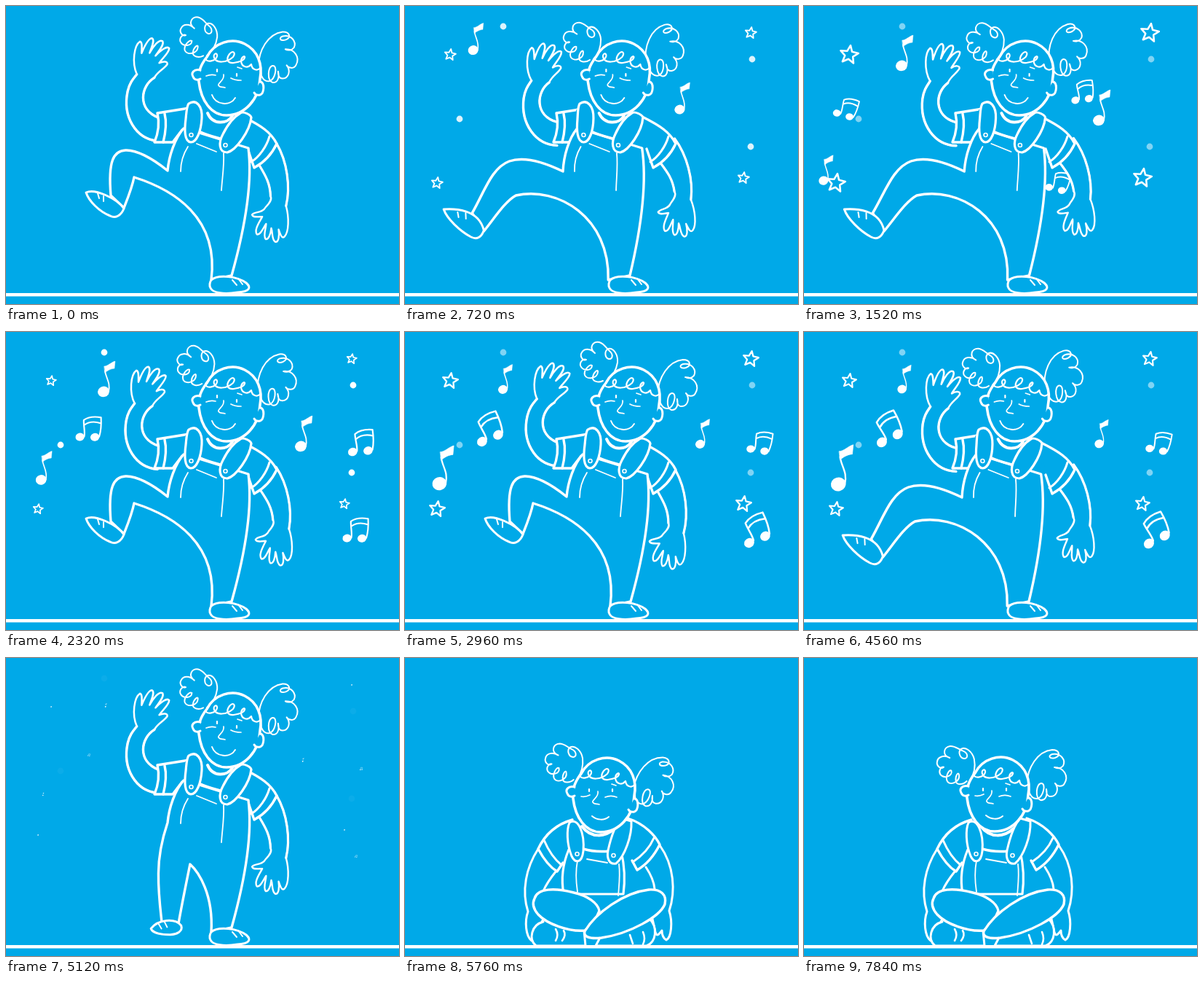
An HTML page with a canvas for the animation above (8000 ms loop, 540 by 409 pixels).

```html
<!DOCTYPE html>
<html lang="en">
<head>
<meta charset="utf-8">
<title>Dancing girl</title>
<style>
html, body { margin: 0; height: 100%; overflow: hidden; background: #00a9e8; }
canvas { display: block; }
</style>
</head>
<body>
<canvas id="stage" width="540" height="409"></canvas>
<script>
const ctx = document.getElementById('stage').getContext('2d');
const BLUE = '#00a9e8', WHITE = '#fff', LOOP = 8000, STEP = 80, BEAT = 960, PULSE = 1760;

const clamp = x => Math.max(0, Math.min(1, x));
const ramp = (x, a, b) => { const p = clamp((x - a) / (b - a)); return p * p * (3 - 2 * p); };
const lerp = (a, b, p) => a + (b - a) * p;
const wave = x => Math.cos(2 * Math.PI * x);

// Blend two paths that share the same commands
function mix(a, b, p) {
  const to = b.match(/-?[\d.]+/g);
  let i = 0;
  return a.replace(/-?[\d.]+/g, n => lerp(+n, +to[i++], p).toFixed(2));
}

// Linear interpolation through [position, value] pairs
function keyed(x, keys) {
  const i = Math.max(1, keys.findIndex(k => k[0] >= x));
  const [a, u] = keys[i - 1], [b, v] = keys[i];
  return lerp(u, v, (x - a) / (b - a));
}

function line(d, width = 3.4, fill) {
  const path = new Path2D(d);
  if (fill) { ctx.fillStyle = fill; ctx.fill(path); }
  ctx.lineWidth = width;
  if (width) ctx.stroke(path);
}
const solid = (d, width = 3.4) => line(d, width, BLUE);

function oval(x, y, rx, ry = rx, turn = 0) {
  ctx.beginPath();
  ctx.ellipse(x, y, rx, ry, turn, 0, 7);
  ctx.fillStyle = WHITE;
  ctx.fill();
}

function group(draw, x = 0, y = 0, deg = 0, px = 0, py = 0, scale = 1) {
  ctx.save();
  ctx.translate(px + x, py + y);
  ctx.rotate(deg * Math.PI / 180);
  ctx.scale(scale, scale);
  ctx.translate(-px, -py);
  draw();
  ctx.restore();
}

/* ---------- stars, dots and notes ---------- */

function star(x, y, r) {
  if (r < 0.5) return;
  ctx.beginPath();
  for (let i = 0; i < 10; i++) {
    const a = i * Math.PI / 5 - 1.42, q = (i % 2 ? 0.45 : 1) * (r - 1);
    ctx.lineTo(x + q * Math.cos(a), y + q * Math.sin(a));
  }
  ctx.closePath();
  ctx.lineWidth = 0.6 + r * 0.14;
  ctx.stroke();
}

function single() {
  oval(-3, 17, 8, 7.3, -0.3);
  line('M-1 -12C0 -2 7 4 4 17', 1.8);
  line('M-2 -18C3 -18 8 -24 13 -25L12 -15C8 -15 2 -12 -1 -9Z', 0.5, WHITE);
}

function double() {
  oval(-12, 12, 6.3, 5.6, -0.3);
  oval(9, 11, 6.3, 5.6, -0.3);
  line('M-6 11C-5 4 -8 -4 -8 -12C0 -18 8 -18 16 -17C17 -8 17 2 15 10M-7 -5C0 -11 8 -11 16 -9', 2.2);
}

// shape, start, rest, first and last time of flight, scale, size swing, turn swing, flight turn
const NOTES = [
  [single, -20, -10, 137, 65, 240, 960, 0.97, 0.18, 0, 0],
  [single, 300, 90, 408, 140, 240, 960, 0.97, 0.18, 0, 0],
  [single, 2, 274, 51, 187, 960, 2000, 0.98, -0.31, 0, 0],
  [double, -12, 150, 114, 133, 960, 2000, 1, -0.16, 24, 35],
  [double, 250, 75, 488, 152, 960, 2000, 1, 0.1, -14, -5],
  [double, 184, 204, 481, 272, 960, 2000, 1, -0.16, 24, 30]
];
const STARS = [[62, 67], [475, 37], [44, 243], [465, 236]];
const DOTS = [[135, 28], [477, 73], [75, 155], [475, 193]];

function music(t) {
  const phase = ((t - 3680) / PULSE + 9) % 1, k = wave(phase);
  const out = 1 - ramp(t, 4800, 5200), on = ramp(t, 240, 720) * out;
  const size = keyed(phase, [[0, 14], [0.227, 8], [0.5, 11], [0.773, 14], [1, 14]]);
  STARS.forEach(([x, y]) => star(x, y, size * on));
  ctx.globalAlpha = on * keyed(phase, [[0, 0], [0.2, 1], [0.25, 1], [0.5, 0.5], [0.773, 0.5], [1, 0]]);
  DOTS.forEach(([x, y]) => oval(x, y, 4.4));
  ctx.globalAlpha = 1;
  if (out <= 0) return;
  for (const [shape, x0, y0, x1, y1, from, to, size, swell, sway, spin] of NOTES) {
    if (t <= from) continue;
    const p = ramp(t, from, to);
    const s = lerp(0.55, size + swell * k, Math.min(1, p * 1.3)) * out;
    group(shape, lerp(x0, x1, p), lerp(y0, y1, p), sway * k + spin * (1 - p), 0, 0, s);
  }
}

/* ---------- girl ---------- */

const LEG = {
  bent: 'M244 168C232 182 224 205 222 226C200 208 178 197 164 198C148 199 140 212 144 260L162 277C168 262 173 250 176 235C230 252 293 290 282 376L310 370C324 320 340 250 333 195L262 173',
  kick: 'M246 168C234 182 226 205 224 227C194 212 169 207 151 213C126 222 115 255 97 284L112 309C128 290 143 268 158 260C216 247 286 290 280 376L310 370C324 320 340 250 334 195L264 173',
  down: 'M244 168C232 182 224 205 222 226C218 250 214 280 216 310C218 340 222 360 224 376L248 376C254 340 260 310 264 290C270 300 284 330 282 376L310 370C324 320 340 250 333 195L262 173'
};
const SHOE = {
  bent: 'M110 256C122 250 152 264 162 278C158 288 150 292 143 288C128 282 114 268 110 256Z',
  kick: 'M58 279C72 278 106 278 112 308C107 320 100 320 94 317C79 309 62 292 58 279Z',
  down: 'M212 388C222 374 244 370 252 380C256 388 246 392 238 393C228 394 214 394 212 388Z'
};
const TOES = {
  bent: 'M126 257L128 264M134 261L134 268',
  kick: 'M77 283L78 290M88 284L88 292',
  down: 'M222 381L226 387M230 377L234 384'
};

function wavingArm() {
  solid('M207 184C178 180 160 150 168 115C171 103 176 98 181 92C174 76 178 52 186 47C190 48 188 58 188 63C192 54 198 42 203 43C207 47 201 56 199 63C204 54 212 44 217 47C220 52 211 61 207 67C214 60 223 53 226 57C226 63 216 71 212 77C218 74 224 75 223 79C218 86 210 88 205 97C186 108 180 140 210 152', 2.5);
  line('M207 184C178 180 160 150 168 115C171 103 176 98 181 92M205 97C186 108 180 140 210 152');
}

function hangingArm() {
  solid('M372 190C386 215 390 250 383 276C387 292 386 312 380 318C376 322 374 314 372 308C373 316 372 326 367 325C362 322 364 312 362 306C361 314 358 322 354 321C350 316 355 306 355 300C351 305 347 316 342 314C338 308 346 297 350 290C344 290 337 291 336 287C340 282 350 286 355 277C362 270 364 266 362 262C362 245 356 234 348 220', 2.4);
  line('M372 190C386 215 390 250 383 276M362 262C362 245 356 234 348 220', 3.2);
}

function standing(c, kick, down, lean) {
  const pose = o => mix(mix(o.bent, o.kick, kick), o.down, down);
  group(wavingArm, 0, 4 + 4.5 * c, -3 - 3.5 * c, 205, 165);
  group(hangingArm, 0, -3 - 3.5 * c, -4 - 4.5 * c, 355, 200);
  solid('M252 140L208 147C211 160 209 175 204 187L229 187L242 170');
  line('M218 148C221 160 219 175 216 187');
  solid('M326 152C350 164 364 173 372 189C365 204 354 215 341 222L332 196');
  line('M362 179C358 193 348 207 337 214', 3);

  ctx.save();
  ctx.transform(1, 0, -lean / 245, 1, lean * 395 / 245, 0);
  line('M246 142L278 146L325 150L338 162L333 196L240 180Z', 0, BLUE);
  solid(pose(LEG));
  line('M250 193C243 204 240 215 240 227M299 202C300 220 297 236 296 253M262 189L289 200', 1.8);
  line('M265 172C278 178 288 180 298 183', 3.4);
  line('M277 147C284 164 304 162 311 151', 4);
  solid('M251 134C262 127 270 138 269 154C268 172 262 187 254 187C245 186 245 170 247 155C248 146 248 138 251 134Z', 3.2);
  solid('M322 147C326 144 336 149 337 153C335 172 316 198 304 201C292 201 292 187 298 176C304 164 313 152 322 147Z', 3.2);
  line('M252 177a2.5 2.5 0 1 0 5 0a2.5 2.5 0 1 0 -5 0M299 191a2.5 2.5 0 1 0 5 0a2.5 2.5 0 1 0 -5 0', 1.6);
  solid(pose(SHOE), 3);
  line(pose(TOES), 2);
  ctx.restore();

  solid('M282 376C292 368 318 371 330 380C338 387 334 392 318 393C300 396 284 394 281 387C279 384 280 379 282 376Z', 3);
  line('M311 376L317 383M319 374L325 382', 2);
}

function sitting() {
  // arms and hands
  solid('M183 262C166 288 160 320 169 348C164 362 166 382 174 388L200 340L190 320C194 310 200 302 208 292', 3);
  solid('M350 257C370 285 372 320 363 347C368 362 366 384 359 387C354 384 353 378 353 374C350 378 346 384 344 376L336 340L343 317C342 305 337 296 331 287', 3);
  // shirt
  line('M228 222L308 220L322 285L300 325L216 325L209 290Z', 0, BLUE);
  solid('M230 222C205 229 191 245 183 262C190 275 199 287 209 293L217 281');
  line('M191 250C197 264 205 276 215 284', 3);
  solid('M306 220C330 228 344 244 350 256C342 272 331 284 319 291L312 278');
  line('M342 247C336 261 325 272 313 280', 3);
  line('M243 231C256 248 275 246 288 234', 4);
  // dungarees
  solid('M225 263C217 282 214 302 218 324L300 324C303 302 301 282 297 265', 3.2);
  line('M245 262C258 266 270 266 281 265', 3.6);
  line('M237 278C234 294 235 308 237 321M250 276L278 281M294 283C296 298 294 312 293 326', 1.8);
  solid('M226 226C238 218 247 240 245 265C243 282 234 282 229 272C222 255 222 235 226 226Z', 3);
  solid('M297 220L311 224C312 244 302 272 290 282C280 284 277 274 279 264C283 246 288 230 297 220Z', 3);
  line('M234 269a2.5 2.5 0 1 0 5 0a2.5 2.5 0 1 0 -5 0M284 271a2.5 2.5 0 1 0 5 0a2.5 2.5 0 1 0 -5 0', 1.6);
  // crossed legs and shoes
  solid('M190 362C174 366 169 386 180 395L248 395L246 374', 3);
  solid('M336 358C348 370 345 390 332 395L262 395L270 380', 3);
  line('M207 372C210 377 210 383 207 388M218 374C221 379 219 384 216 388M309 380L313 392M327 376C330 383 329 389 327 393', 2.6);
  solid('M178 330C182 316 205 315 232 322C250 326 265 336 267 347C262 360 255 368 247 374C225 376 195 365 183 352C176 344 175 336 178 330Z');
  solid('M247 375C262 350 300 322 335 318C352 317 360 325 357 338C350 355 310 378 270 384C252 386 245 382 247 375Z');
}

const bunchLeft = () => solid('M272 67C266 70 257 68 258 62C259 55 266 50 265 55C264 64 250 66 247 59C245 52 254 44 257 46C257 54 244 54 241 46C240 40 246 36 249 38C243 40 240 32 243 28C246 22 255 22 261 29C252 22 258 12 267 14C274 16 276 22 281 26C287 31 285 38 280 37C274 35 274 26 279 23C287 21 293 32 292 42C290 54 284 62 277 67', 2);
const bunchRight = () => solid('M347 86C348 62 362 40 382 38C392 38 394 46 386 49C378 51 376 46 382 44C394 42 401 52 397 60C394 64 388 64 385 62C398 62 405 74 399 84C396 90 388 88 386 84C392 92 388 102 380 102C374 102 374 96 374 92C376 102 372 108 366 107C358 104 360 84 367 84C374 84 370 102 362 105C354 106 350 98 350 92', 2);

function head(left, right, calm) {
  group(bunchLeft, 0, 0, left, 308, 95);
  group(bunchRight, 0, 0, right, 308, 95);
  solid('M276 70C286 50 310 43 328 52C346 61 353 80 349 100C348 128 328 150 303 150C282 150 268 130 265 104C263 92 268 80 276 70Z', 3.6);
  solid('M267 88C258 86 254 92 257 97C259 102 264 102 267 100', 3);
  solid('M349 104C356 104 355 120 349 122C345 123 342 121 341 119', 3);
  line('M274 72C276 78 288 76 290 69C291 63 284 65 286 71C289 79 303 78 312 70C316 64 312 60 307 66C301 74 306 79 313 78C320 77 327 75 328 71C329 67 323 70 323 76C324 84 332 86 337 80C338 88 346 90 350 84', 2.2);
  line(mix('M275 96C280 94 284 94 288 95M309 99C314 102 318 102 323 102', 'M276 101C280 102 284 101 288 99M309 102C314 100 320 100 325 102', calm), 1.7);
  line(mix('M290 87L290 90M317 93L317 96', 'M287 91L287 94M319 91L319 94', calm), 2.2);
  line('M299 94C301 102 290 106 292 109C294 112 297 111 301 112M318 84L324 86', 1.7);
  line(mix('M283 122C288 136 308 138 315 126', 'M291 128C298 134 308 134 314 129', calm), 2);
}

function girl(t) {
  const beat = Math.min(t, 4800) / BEAT;
  const c = wave(beat - 0.65);
  const lean = -14 * Math.max(0, wave(beat - 0.72)) ** 1.5;
  const kick = ramp(wave(beat - 0.7), -0.2, 0.66);
  const down = ramp(t, 4840, 5200);
  const drop = ramp(t, 5240, 5640);
  const rest = ramp(t, 5760, 6400);
  const turn = -5.5 - 6 * c;

  if (t < 5440) {
    ctx.save();
    ctx.translate(0, 395);
    ctx.scale(1, 1 - 0.363 * drop);
    ctx.translate(0, -395);
    standing(c, kick, down, lean * 0.75 - 34 * drop);
    ctx.restore();
  } else {
    sitting();
  }
  group(() => head(lerp(lerp(turn, -16, drop), -20, rest), lerp(lerp(turn, 7, drop), 0, rest), drop),
    lerp(lerp(lean, -34, drop), -41, rest), lerp(89 * drop, 88, rest));
}

function frame(now) {
  const t = Math.floor(now % LOOP / STEP) * STEP;
  ctx.fillStyle = BLUE;
  ctx.fillRect(0, 0, 540, 409);
  ctx.strokeStyle = WHITE;
  ctx.lineCap = ctx.lineJoin = 'round';
  music(t);
  girl(t);
  ctx.fillStyle = WHITE;
  ctx.fillRect(0, 394, 540, 4.5);
  requestAnimationFrame(frame);
}
requestAnimationFrame(frame);
</script>
</body>
</html>
```
